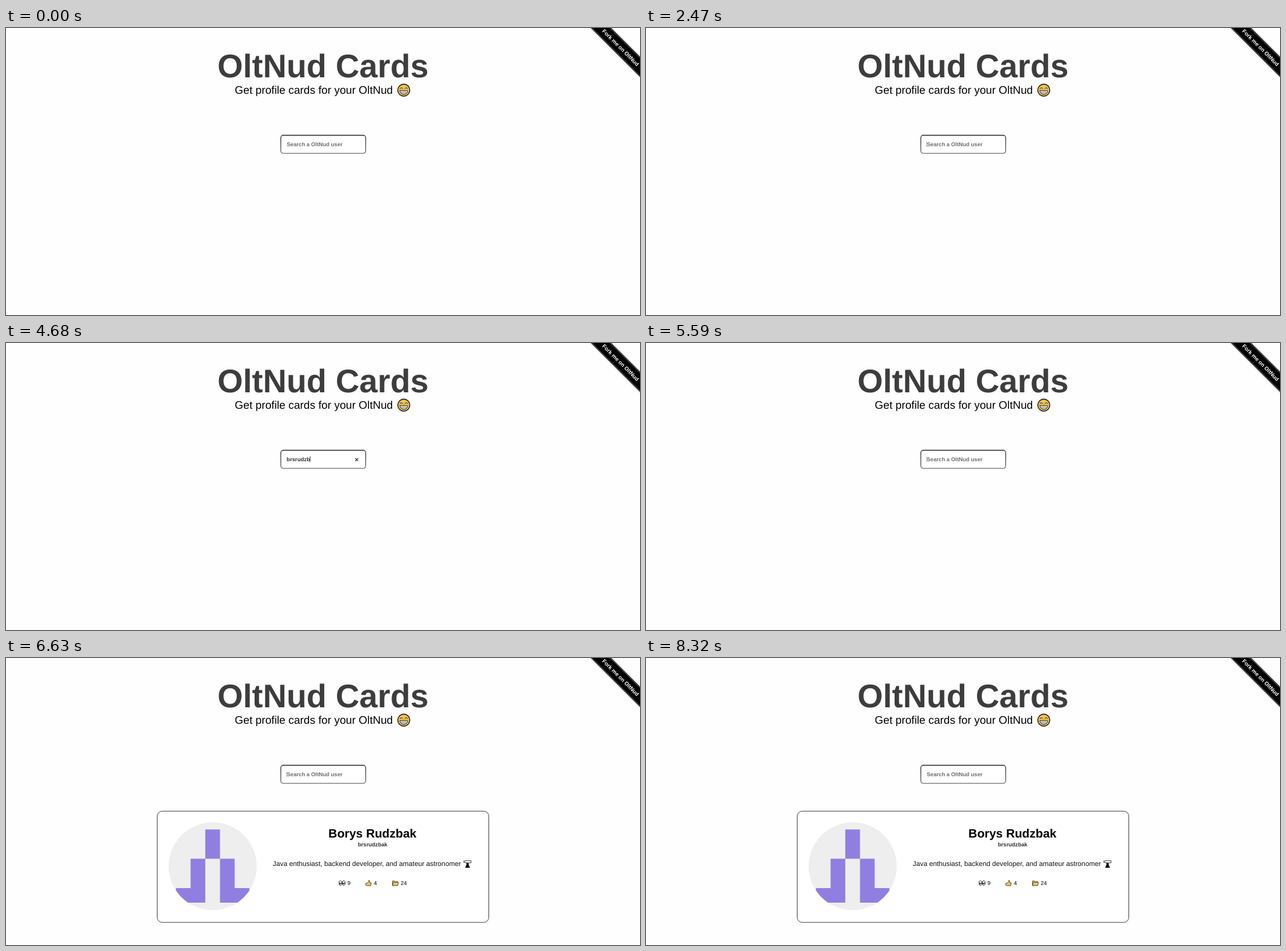
Recreate the animation shown at these times as an HTML page. Size 1000 px wide and 454 px high, loop 8450 ms.

```html
<!DOCTYPE html>
<html lang="en">
<head>
<meta charset="utf-8">
<title>Profile cards</title>
<style>
html, body { margin: 0; width: 100%; height: 100%; overflow: hidden; background: #fefefe; }
svg { display: block; width: 100vw; height: 100vh; }
text { font: 8.667px "Liberation Sans", Arial, sans-serif; text-rendering: geometricPrecision; }
.mid { text-anchor: middle; }
text.bold { font-weight: 700; }
text.title { font-size: 51.7px; fill: #3d3d3f; }
text.sub { font-size: 17.33px; }
text.name { font-size: 19.07px; }
text.bio { font-size: 10.83px; fill: #111; }
.hint { fill: #6e6e6e; }
.dark { fill: #333; }
.ink { stroke: #1a1a1a; stroke-linejoin: round; stroke-linecap: round; }
.line { fill: none; }
</style>
</head>
<body>
<svg viewBox="0 0 1000 454">
  <defs>
    <linearGradient id="edge" x2="0" y2="1">
      <stop offset="0" stop-color="#111"/>
      <stop offset="1" stop-color="#555"/>
    </linearGradient>
    <clipPath id="round"><circle cx="326" cy="329.4" r="69.5"/></clipPath>
    <filter id="blur" x="-10%" y="-50%" width="120%" height="200%"><feGaussianBlur stdDeviation="1.4"/></filter>
  </defs>

  <text class="bold title mid" x="500" y="77.7">OltNud Cards</text>
  <text class="sub" x="360.8" y="104">Get profile cards for your OltNud</text>

  <!-- grinning face -->
  <g class="ink" transform="translate(627.4 98.2)">
    <circle r="9.5" fill="#f0c155" stroke-width="1.4"/>
    <path class="line" d="M-6.2-2.3q2.2-3 4.4 0M1.8-2.3q2.2-3 4.4 0" stroke-width="1"/>
    <path d="M-6 .8H6Q5.6 6.6 0 6.6T-6 .8Z" fill="#fff" stroke-width=".9"/>
    <path class="line" d="M-5.3 3.6H5.3M-2.6 1V6M0 1V6.5M2.6 1V6" stroke-width=".4"/>
  </g>

  <!-- corner ribbon -->
  <g transform="translate(969.5 30.9) rotate(45)">
    <rect x="-90" y="-11.2" width="180" height="22.4" fill="#999" filter="url(#blur)"/>
    <rect x="-90" y="-11.2" width="180" height="22.4"/>
    <path d="M-90-10H90M-90 10H90" stroke="#999" stroke-width=".7"/>
    <text class="bold mid" y="3.1" fill="#fff">Fork me on OltNud</text>
  </g>

  <!-- search field -->
  <rect x="433.5" y="169.6" width="133.8" height="28.6" rx="4" fill="#fff" stroke="url(#edge)" stroke-width="1.1"/>
  <text id="hint" class="bold hint" x="442.8" y="186.8">Search a OltNud user</text>
  <text id="typed" class="bold dark" x="442.6" y="186.8"></text>
  <path id="clear" d="M550.9 182.2l4.6 4.6m0-4.6l-4.6 4.6" stroke="#34566e" stroke-width="1.5"/>
  <rect id="caret" y="179.2" width=".9" height="9.2"/>

  <!-- profile card -->
  <g id="card">
    <rect x="238.5" y="242.3" width="523" height="175.9" rx="8" fill="#fff" stroke="#333" stroke-width=".9"/>
    <g clip-path="url(#round)">
      <rect x="256" y="259" width="140" height="141" fill="#eee"/>
      <path transform="translate(268 271.2) scale(23.17)" fill="#907fe0"
        d="M2 0H3V2H4V4H5V5H3V2H2V5H0V4H1V2H2Z"/>
    </g>
    <text class="bold name mid" x="578" y="284.1">Borys Rudzbak</text>
    <text class="bold dark mid" x="578.3" y="297.6">brsrudzbak</text>
    <text class="bio" x="420.8" y="329.4">Java enthusiast, backend developer, and amateur astronomer</text>

    <!-- telescope -->
    <g class="ink" transform="translate(728 326)" stroke-width=".8">
      <path d="M-5.6-4.8H-3V-5.4H5.5V-2H-3V-2.6H-5.6Z" fill="#fff"/>
      <path d="M-1.2-1.5H1.2L1.6 1.5L3.4 5.4H-3.4L-1.6 1.5Z"/>
    </g>
    <!-- eyes -->
    <g class="ink" transform="translate(530 356)" stroke-width=".9">
      <ellipse cx="-2.6" rx="2.2" ry="3.7" fill="#fff"/>
      <ellipse cx="2.6" rx="2.2" ry="3.7" fill="#fff"/>
      <circle cx="-2.9" cy=".7" r=".8"/><circle cx="2.3" cy=".7" r=".8"/>
    </g>
    <!-- thumb -->
    <path class="ink" transform="translate(571.8 356)" fill="#f2bf58" stroke-width=".7"
      d="M-4 .4H-2.2L.2-2.4V-4.4Q2.3-4.6 1.9-.8H4Q4.4 2 3.4 4.2H-2.2L-4 3.6Z"/>
    <!-- folder -->
    <g class="ink" transform="translate(614 356)" stroke-width=".6">
      <path d="M-4.5 3.5V-3.3H-1L0-2.3H4V3.5Z" fill="#e0a83c"/>
      <path d="M-4.4 3.5L-2.7-.9H5.2L3.7 3.5Z" fill="#f6cf72"/>
    </g>
    <text x="538.4" y="359">9</text>
    <text x="580.2" y="359">4</text>
    <text x="622.6" y="359">24</text>
  </g>
</svg>
<script>
const LOOP = 8450, CARD_AT = 5850, TEXT_X = 442.6;
const USER = 'brsrudzbak';
// [time, letters in the field]
const KEYS = [[0, 0], [2990, 1], [3120, 2], [3380, 4], [3510, 5], [3900, 6],
  [4160, 7], [4680, 8], [4940, 10], [5590, 0]];
const CARET_ON = [[1430, 1950], [2470, 5460], [5590, 6110], [6630, 7280], [7800, 8320]];

const [hint, typed, clear, caret, card] =
  ['hint', 'typed', 'clear', 'caret', 'card'].map(id => document.getElementById(id));
const show = (el, on) => { el.style.visibility = on ? 'visible' : 'hidden'; };

function draw(t) {
  const count = KEYS.filter(([at]) => at <= t).pop()[1];
  typed.textContent = USER.slice(0, count);
  const width = count ? typed.getComputedTextLength() : 0;
  caret.setAttribute('x', TEXT_X - 0.3 + width);
  caret.setAttribute('fill', count ? '#333' : '#aaa');
  show(caret, CARET_ON.some(([from, to]) => t >= from && t < to));
  show(hint, !count);
  show(clear, count > 0);
  show(card, t >= CARD_AT);
}

const start = performance.now();
function tick() {
  draw((performance.now() - start) % LOOP);
  requestAnimationFrame(tick);
}
tick();
</script>
</body>
</html>
```
